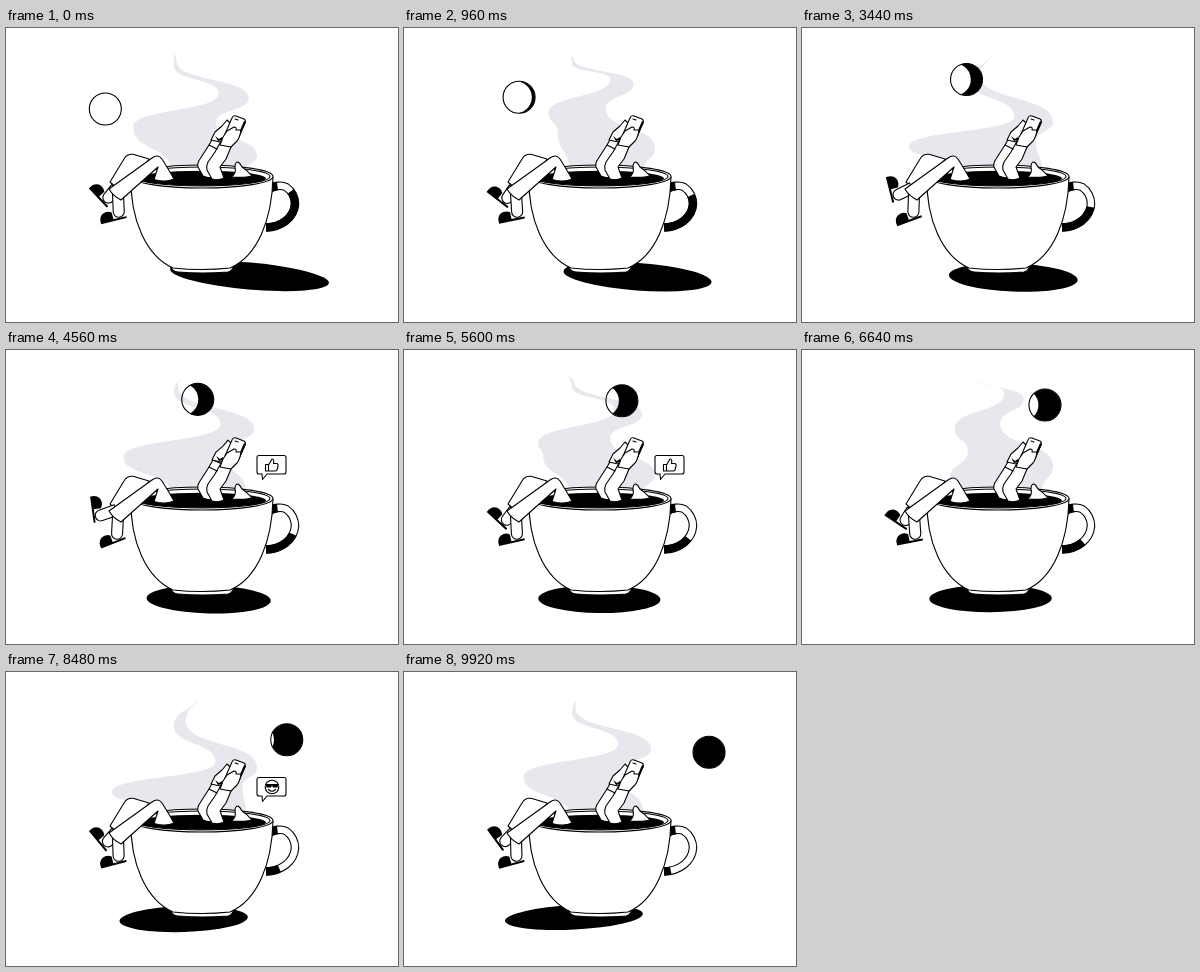
These frames come from a looping animation (392 px wide and 294 px high, 10 s). An HTML page:

```html
<!DOCTYPE html>
<html lang="en">
<head>
<meta charset="utf-8">
<title>Coffee break</title>
<style>
html, body { margin: 0; width: 100%; height: 100%; overflow: hidden; background: #fff; }
svg { display: block; width: 100%; height: 100%; }
.line { fill: #fff; stroke: #000; stroke-width: 1.1; stroke-linejoin: round; stroke-linecap: round; }
.open { fill: none; }
.band { fill: none; stroke: #000; }
</style>
</head>
<body>
<svg viewBox="0 0 392 294">
  <defs>
    <mask id="phase" maskUnits="userSpaceOnUse" x="-20" y="-20" width="40" height="40">
      <circle r="16" fill="#fff"/>
      <circle id="light" r="16"/>
    </mask>
    <path id="ring" pathLength="100" d="M262 162C268 157 276 157 280 159C286 163 289 170 289 176C288 190 275 199 260 199.5"/>
    <path id="shoe" d="M0 1Q-1-6 4-9Q9-11 13-8L13-1H26Q27 0 26 1Z"/>
  </defs>

  <path id="steam" fill="#e8e7ee"/>
  <ellipse id="shadow"/>

  <g id="moon">
    <circle r="16" mask="url(#phase)"/>
    <circle r="16" class="line open"/>
  </g>

  <use href="#ring" class="band" stroke-width="8.6"/>
  <use href="#ring" class="band" style="stroke:#fff" stroke-width="6.4"/>
  <use href="#ring" id="shade" class="band" stroke-width="8"/>

  <path class="line" d="M164 237Q166 244 172 244Q196 246 222 244Q227 243 228 236Z"/>
  <path class="line" d="M125 149C124 191 140 228 167 240Q196 243 224 240C252 228 266 191 267 149Z"/>
  <ellipse class="line" cx="196" cy="148.5" rx="71" ry="11.5"/>
  <ellipse class="line" cx="196" cy="148.5" rx="68" ry="9.5"/>
  <ellipse cx="196" cy="150.3" rx="64" ry="7.5"/>

  <path class="line" d="M225 149C229 147 230 143 229 139Q229 134 232 134Q234 135 236 139Q241 142 246 148Q239 150 225 149Z"/>

  <path class="line" d="M197 148L192 139Q191 135 194 131L203 117L207 110L216 114L206 134L210 149Q203 151 197 148Z"/>
  <path class="line" d="M206 151L201 142Q200 138 202 134L209 124L214 115L225 119L220 131L214 139L218 150Q212 153 206 151Z"/>
  <path class="line open" d="M203 117L211 121"/>
  <g id="hand">
    <path class="line" d="M205 112L209 104L216 98L221 92L226 97L219 109L214 114Z"/>
    <path d="M209 108L213 111L216 109L216 112L212 113Z"/>
  </g>
  <path class="line" d="M219 106L226 90Q227 87 230 88L238 91Q240 92 239 95L231 112Z"/>
  <path class="line open" style="stroke-width:2.2" d="M238.600 94.500L231.500 111"/>
  <path class="line open" d="M229 91L232 92"/>
  <path class="line" d="M214 117L217 109L221 103L228 99Q231 99 230 102L235 102Q234 109 231 113L225 119Z"/>

  <path class="line" d="M143 131L127 126.300Q121 125.500 118 131L104 154L114 163L138 140Z"/>
  <g id="far"><path class="line"/><use href="#shoe"/></g>
  <g id="near"><path class="line"/><use href="#shoe"/></g>
  <path class="line" d="M103 161L146 130Q152 125.500 156 131Q163 142 168 151Q160 155 148 151.500L152 139L115 172Q107 168 103 161Z"/>

  <g id="bubble">
    <path class="line" d="M253 105.500H278Q280 105.500 280 107.500V122Q280 124 278 124H261L256.500 129.500L256 124H253Q251 124 251 122V107.500Q251 105.500 253 105.500Z"/>
    <path class="icon line open" d="M265.500 120.500C256 114 260 109 263 109.500Q265 110 265.500 112Q266 110 268 109.500C271 109 275 114 265.500 120.500Z"/>
    <path class="icon line open" d="M259.500 114.500H262.500V121H259.500ZM262.500 115L266 109Q268.500 109 267.500 113.500H271Q272.500 114 272 116L271 120Q270.500 121 269 121H262.500"/>
    <g class="icon">
      <circle class="line" cx="266" cy="115" r="6.8"/>
      <path d="M259.500 112H272.500L271.500 115.500H267L266 113.500L265 115.500H260.500Z"/>
      <path class="line open" d="M262.500 117.500Q266 121 269.500 117.500"/>
    </g>
  </g>
</svg>
<script>
const LOOP = 10, STEAM = 5.2, TAU = 2 * Math.PI;
const $ = (q) => document.querySelector(q);
const set = (q, attrs) => { for (const k in attrs) $(q).setAttribute(k, attrs[k]); };
const clamp = (v) => Math.max(0, Math.min(1, v));
const mix = (a, b, u) => a + (b - a) * u;
const smooth = (v) => { const u = clamp(v); return u * u * (3 - 2 * u); };

// Steam bulges are born at the cup and rise; each has an outer and an inner turning point
function rightBulge(age) {
  const x = (y) => 185 + 66 * smooth(y / 90);
  const young = clamp(1 - age / 3.4);
  const y = 128 - 8 * age - .6 * age * age;
  const inY = y - 5 - 16 * young;
  return { outer: [x(y), y], inner: [x(inY) - .55 * (inY - 18) * (1 + 1.5 * young), inY] };
}

function leftBulge(age) {
  const x = (y) => 180 - mix(15, 12 + 65 * smooth((y - 55) / 75), smooth((age - 1.2) / .7));
  const y = 82 + 46 * Math.cos(Math.PI * (age - 1.4) / 10);
  const inY = y - 5;
  return { outer: [x(y), y], inner: [x(inY) + .014 * (inY - 20) ** 2, inY] };
}

function steamPath(s) {
  const p = s % STEAM, left = [], right = [];
  const tip = [179 + 14 * Math.cos(TAU * (p - 3.1) / STEAM), 23 - 4 * Math.cos(TAU * (p - 4) / STEAM)];
  for (let age = p; age < 11.4; age += STEAM) {
    const r = rightBulge(age), l = leftBulge(age);
    right.push(r.outer);
    if (age > .3) left.push(r.inner);
    if (age > 1.2) left.push(l.outer);
    if (age > 2.6) right.push(l.inner);
  }
  const visible = (pts) => pts.filter((q) => q[1] > tip[1] + 3).sort((a, b) => a[1] - b[1]);
  const pts = [tip, ...visible(right), [240, 142], [165, 142], ...visible(left).reverse(), tip];
  return pts.reduce((d, q, i) => {
    if (!i) return `M${q}`;
    const o = pts[i - 1], h = (q[1] - o[1]) * .55;
    return `${d}C${o[0]} ${o[1] + h} ${q[0]} ${q[1] - h} ${q}`;
  }, "");
}

// Ankle from the hem (hx, hy) to a shoe with its toe at (x, y)
function foot(id, hx, hy, x, y, deg) {
  const a = deg * Math.PI / 180, c = Math.cos(a), s = Math.sin(a);
  const ax = x + 20 * c + 7 * s, ay = y + 20 * s - 7 * c;
  const len = Math.hypot(ax - hx, ay - hy) || 1;
  const nx = (hy - ay) / len * 5.5, ny = (ax - hx) / len * 5.5;
  set(`${id} path`, {
    d: `M${hx + nx} ${hy + ny}L${ax + nx} ${ay + ny}A5.5 5.5 0 0 0 ${ax - nx} ${ay - ny}L${hx - nx} ${hy - ny}Z`
  });
  set(`${id} use`, { transform: `translate(${x} ${y}) rotate(${deg})` });
}

function drawSky(u) {
  const x = mix(99.3, 306.3, u - .22 * Math.sin(TAU * u) / TAU);
  const y = 81 - 31.6 * Math.sin(Math.PI * u ** .9);
  set("#moon", { transform: `translate(${x} ${y})` });
  set("#light", { cx: -34 * u });

  const cx = 243.5 - 108 * u + 46 * u * u - 12 * u ** 3;
  const cy = 248 + 8 * u - 10.8 * u * u;
  const rx = 61 + 52 * (.6 - u) ** 2, ry = 13.5 + 3.5 * u - 4.8 * u * u;
  set("#shadow", { cx, cy, rx, ry, transform: `rotate(${5 - 8 * u} ${cx} ${cy})` });

  const shade = mix(68, 8, u);
  set("#shade", { "stroke-dasharray": `13 ${87 - shade} ${shade} 100` });
}

function drawFeet(s) {
  const v = Math.cos(TAU * (.71 * s - 1.31));
  foot("#far", 110, 160, 84 + 1.2 * v, 156 - 10.5 * v, 57 + 28 * v);
  foot("#near", 112, 166, 95, 196 + 1.8 * v, -16 - 6 * v);
}

const icons = document.querySelectorAll(".icon");

function drawBubble(s) {
  const n = Math.floor((s - 1) / 3.1), t = s - 1 - 3.1 * n;
  const size = n < 0 ? 0 : smooth(Math.min(t, 1.8 - t) / .24);
  const tap = n < 0 ? 0 : Math.sin(Math.PI * clamp(t / .8));
  icons.forEach((el, i) => { el.style.display = i === n ? "" : "none"; });
  set("#bubble", { transform: `translate(256.5 129.5) scale(${size}) translate(-256.5 -129.5)` });
  set("#hand", { transform: `translate(${tap} ${-2 * tap})` });
}

function tick() {
  const s = performance.now() / 1000 % LOOP;
  drawSky(s / LOOP);
  set("#steam", { d: steamPath(s) });
  drawFeet(s);
  drawBubble(s);
  requestAnimationFrame(tick);
}
tick();
</script>
</body>
</html>
```
